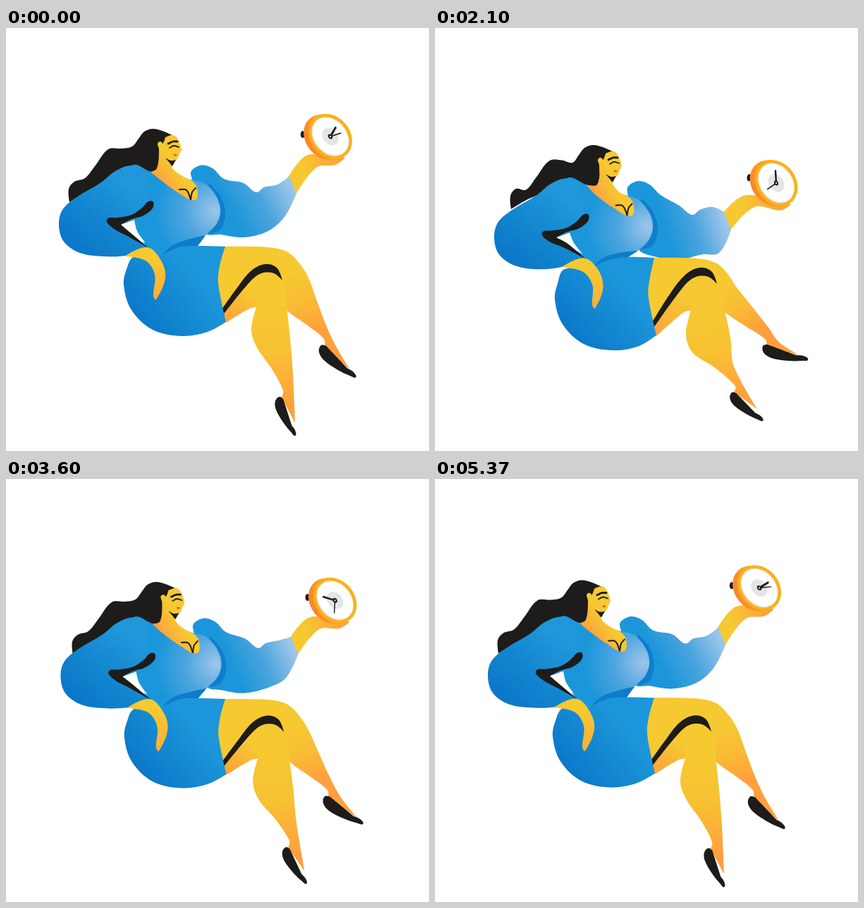
An HTML page with a canvas that plays this animation: 600x600 px, repeating every 5410 ms.

```html
<!DOCTYPE html>
<html lang="en">
<head>
<meta charset="utf-8">
<title>Tossing a watch</title>
<style>
html, body { margin: 0; width: 100%; height: 100%; overflow: hidden; background: #fff; }
canvas { display: block; width: 100vmin; height: 100vmin; }
</style>
</head>
<body>
<canvas id="stage" width="600" height="600"></canvas>
<script>
const ctx = document.getElementById('stage').getContext('2d');
const LOOP = 5410, TOSS = LOOP / 4, TURN = 2 * Math.PI, RAD = Math.PI / 180;
const BLACK = '#1d1c1a', YELLOW = '#f6c931', ORANGE = '#ff9f3e';
const BLUE = '#1c96da', DEEP = '#0a76c7', LIGHT = '#9cc6e9';

// Each toss eases from rest through three poses and back
const BEATS = [['rest', 0], ['crouch', 265], ['reach', 572], ['land', 747], ['rest', 977]];
const QUICK = 0.42, MEDIUM = 0.62, SLOW = 1;

// Offset [x, y, turn] of a joint in each pose; pace says how early it follows
const joint = (pace, crouch, reach, land, at = [0, 0]) =>
  ({ pace, at, rest: [0, 0, 0], crouch, reach, land });

const JOINTS = {
  h: joint(QUICK, [4, 20], [-1, -19], [3, 21]),                            // hip
  t: joint(MEDIUM, [4, 20], [-8, -39], [0, 16]),                           // lap
  j: joint(MEDIUM, [6, 18], [2, -37], [8, 5]),                             // front knee
  a: joint(SLOW, [-20, 28, 0], [14, -73, -16], [18, 1, -26], [447, 450]),  // back foot
  p: joint(MEDIUM, [-22, 22, -10], [-2, -36, 3], [33, -6, -26], [388, 523]), // front foot
  s: joint(QUICK, [14, 20], [-8, -17], [9, 19]),                           // shoulder
  b: joint(MEDIUM, [10, 22], [-7, -30], [5, 22]),                          // chest
  o: joint(MEDIUM, [20, 24], [-12, -27], [16, 23]),                        // head
  q: joint(SLOW, [46, -8], [-9, -16], [18, 10]),                           // hair tip
  l: joint(QUICK, [12, 12], [36, -55], [14, 13]),                          // resting hand
  c: joint(SLOW, [24, 44], [-11, -45], [8, 51]),                           // far cuff
  f: joint(SLOW, [52, 74, 24], [-25, -85, -60], [24, 66, 5], [481, 184]),  // tossing hand
  v: joint(SLOW, [26, 22], [-50, -38], [5, 7])                             // watch: tilt, spin
};

const ease = u => (1 - Math.cos(Math.PI * u)) / 2;

function offset(J, t, axis) {
  let i = BEATS.length - 1;
  while (BEATS[i][1] > t) i--;
  if (i === BEATS.length - 1) return 0;
  const [from, t0] = BEATS[i], [to, t1] = BEATS[i + 1];
  let power = axis === 1 ? J.pace : 1;
  if (to === 'crouch') power = 1.5;
  if (to === 'land') power = 1;
  const k = ease(((t - t0) / (t1 - t0)) ** power);
  const v0 = J[from][axis] || 0, v1 = J[to][axis] || 0;
  return v0 + (v1 - v0) * k;
}

const pose = {};

function setPose(t) {
  const breath = 1.8 * Math.max(0, Math.sin(Math.PI * (t - 900) / (TOSS - 900)));
  for (const name in JOINTS) {
    const J = JOINTS[name];
    pose[name] = {
      x: offset(J, t, 0), y: offset(J, t, 1) + (t > 900 ? breath : 0),
      r: offset(J, t, 2) * RAD, at: J.at
    };
  }
}

// A point bound to the mean of its joints; a capital letter ignores the turn
function place(names, x, y) {
  let px = 0, py = 0;
  for (const name of names) {
    const low = name.toLowerCase(), J = pose[low], r = low === name ? J.r : 0;
    const dx = x - J.at[0], dy = y - J.at[1], c = Math.cos(r), s = Math.sin(r);
    px += J.at[0] + J.x + dx * c - dy * s;
    py += J.at[1] + J.y + dx * s + dy * c;
  }
  return { x: px / names.length, y: py / names.length };
}

// "joints x,y x,y! joints ..." where ! marks a corner
function points(spec) {
  let names = '';
  const out = [];
  for (const word of spec.trim().split(/\s+/)) {
    if (/^[a-z]/i.test(word)) { names = word; continue; }
    const [x, y] = word.replace('!', '').split(',').map(Number);
    out.push({ ...place(names, x, y), corner: word.endsWith('!') });
  }
  return out;
}

function trace(ps, closed) {
  const n = ps.length;
  const at = i => closed ? ps[(i + n) % n] : ps[Math.max(0, Math.min(n - 1, i))];
  const dir = i => {
    if (at(i).corner) return [0, 0];
    const dx = at(i + 1).x - at(i - 1).x, dy = at(i + 1).y - at(i - 1).y;
    const d = Math.hypot(dx, dy) || 1;
    return [dx / d, dy / d];
  };
  ctx.beginPath();
  ctx.moveTo(ps[0].x, ps[0].y);
  for (let i = 0; i < (closed ? n : n - 1); i++) {
    const p = at(i), q = at(i + 1), d0 = dir(i), d1 = dir(i + 1);
    const h = Math.hypot(q.x - p.x, q.y - p.y) / 3;
    ctx.bezierCurveTo(p.x + d0[0] * h, p.y + d0[1] * h, q.x - d1[0] * h, q.y - d1[1] * h, q.x, q.y);
  }
}

function shape(spec, fill) {
  trace(points(spec), true);
  ctx.fillStyle = fill;
  ctx.fill();
}

function stroke(spec, width) {
  trace(points(spec), false);
  ctx.strokeStyle = BLACK;
  ctx.lineWidth = width;
  ctx.lineCap = 'round';
  ctx.stroke();
}

function stops(g, colors) {
  colors.forEach((c, i) => g.addColorStop(i / (colors.length - 1), c));
  return g;
}

function linear(spec, ...colors) {
  const [p, q] = points(spec);
  return stops(ctx.createLinearGradient(p.x, p.y, q.x, q.y), colors);
}

function radial(spec, radius, ...colors) {
  const [p] = points(spec);
  return stops(ctx.createRadialGradient(p.x, p.y, 0, p.x, p.y, radius), colors);
}

function oval(x, y, a, b, turn, fill) {
  ctx.beginPath();
  ctx.ellipse(x, y, a, b, turn, 0, TURN);
  ctx.fillStyle = fill;
  ctx.fill();
}

// Rests in the hand until the free flight lifts it off
function drawWatch(t, time) {
  const x = 460 + pose.f.x;
  const y = Math.min(154 + pose.f.y, 25 + 0.0049 * (t - 537) ** 2);
  const a = 30.5, b = 23.5, tilt = 50 * RAD + pose.v.x * RAD, spin = pose.v.y * RAD;
  const c = Math.cos(spin), s = Math.sin(spin);
  const off = (dx, dy) => [x + dx * c - dy * s, y + dx * s + dy * c];

  oval(...off(-39, -3), 3.2, 5, spin, BLACK);
  const rim = ctx.createLinearGradient(x - 34, y + 14, x + 24, y - 10);
  stops(rim, ['#f98232', '#fba41f', '#f9b51a']);
  for (let d = 7; d >= 0; d--) oval(...off(-d, d * 0.15), a + 4, b + 4.5, tilt, rim);
  oval(x, y, a + 4, b + 4.5, tilt, '#f9b218');
  oval(x, y, a, b, tilt, '#e9e6e2');
  oval(x + 0.4, y - 0.4, a - 1.5, b - 1.5, tilt, '#fff');

  ctx.save();
  ctx.translate(x, y);
  ctx.rotate(tilt);
  ctx.scale(1, b / a);
  ctx.rotate(spin - tilt);
  oval(0, 0, 13.5, 13.5, 0, '#e4e5e7');
  ctx.strokeStyle = BLACK;
  ctx.lineCap = 'round';
  const hand = (start, turns, length, width) => {
    const ang = start * RAD - turns * TURN * time / LOOP;
    ctx.beginPath();
    ctx.moveTo(0, 0);
    ctx.lineTo(Math.sin(ang) * length, -Math.cos(ang) * length);
    ctx.lineWidth = width;
    ctx.stroke();
  };
  hand(35, 8, 19, 2.9);
  hand(67, 4, 20, 1.6);
  oval(0, 0, 3.7, 3.7, 0, BLACK);
  oval(0, 0, 1.3, 1.3, 0, '#ddd');
  ctx.restore();
}

function drawFarArm() {
  shape('c 400,212! ccF 424,182 f 452,179 481,184! 467,194 ccF 440,198 c 411,236!',
    linear('ccF 420,205 f 474,188', YELLOW, ORANGE));
  shape(`bo 262,207 275,195 293,199 309,214 boc 337,220 355,233 366,226 385,222
    c 402,210! 412,235! 395,268 boc 370,289 335,297 305,293 b 282,290 282,250`,
    linear('boc 322,265 c 402,222', BLUE, '#4ba4de', LIGHT));
  shape('b 288,220! 304,238 311,263 304,286 288,292! 282,262', '#0d7fcd');
}

function drawTorso() {
  shape(`s 178,195 206,204 bo 262,215 b 284,222 300,242 304,262 298,279 285,292
    t 271,309! ht 222,325 s 190,298 180,268 165,230`,
    radial('b 296,260', 84, LIGHT, '#4ea5df', BLUE));
}

function drawHair() {
  shape(`o 208,143 222,146 240,154! 226,158 218,186 s 222,206! 180,206
    q 118,231 90,247! 89,228 97,218 oq 112,213 126,196 145,172 163,171
    o 179,168 188,157 196,147`, BLACK);
}

function drawFace() {
  shape(`o 226,155! 238,152 246,162 249,173! 246,179 243,186 236,192 237,200
    bo 252,211 264,217 271,227 268,244 245,234 217,214 s 205,204! o 214,199 217,172
    215,164 219,161 223,165!`, linear('o 236,192 s 211,211', YELLOW, ORANGE));
  shape('o 226,184! 234,188 241,187! 236,196!', BLACK);
  stroke('o 230,164 237,161 243,161', 2.8);
  stroke('o 232,170 238,167 245,169', 1.8);
  const mouth = place('o', 240, 180);
  oval(mouth.x, mouth.y, 2.6, 1.5, 0, '#e9602c');
  stroke('bo 246,229 256,230 262,243', 2);
  stroke('bo 262,243 264,233 269,227', 2);
}

// One shoe outline, heel at the joint, toe along the angle
function shoe(name, angle, size) {
  const [x, y] = JOINTS[name].at;
  const c = Math.cos(angle * RAD) * size, s = Math.sin(angle * RAD) * size;
  const outline = [[0, 0], [4, 9], [17, 13], [40, 10], [60, 4], [67, 0], [59, -3], [50, -1], [6, -4]];
  const ps = outline.map(([u, v]) => place(name, x + u * c - v * s, y + u * s + v * c));
  ps[7].corner = ps[8].corner = true;
  trace(ps, true);
  ctx.fillStyle = BLACK;
  ctx.fill();
}

function drawLegs() {
  // back leg
  shape(`t 305,310! 372,311 398,317 413,330 428,352 tA 441,387 A 455,424 a 470,455 489,486! 452,452!
    A 451,441 AAj 428,422 jA 398,400 j 365,360`,
    linear('t 412,345 AAj 438,430', YELLOW, '#f9bb35', ORANGE));
  shoe('a', 42.6, 1);
  // front leg
  shape(`t 305,312! 350,316 jt 383,338 j 396,365 jA 399,402 jjP 403,440 p 407,490 410,560! 391,524!
    P 393,514 jP 376,482 j 357,455 348,429 355,396! 345,398 hht 312,418! 296,365`,
    linear('j 380,385 p 390,535', YELLOW, '#f8c033', ORANGE));
  shape('j 355,396! 345,398 hht 312,418! 306,405 j 330,380 350,370',
    linear('j 345,372 hht 318,416', 'rgba(255,159,62,0)', 'rgba(255,159,62,.85)'));
  shoe('p', 68, 0.89);
  shape('hht 304,402! j 326,371 347,345 367,335 384,340 392,358! 380,348 362,348 346,360 hht 307,408!', BLACK);
}

function drawSkirt() {
  shape('ht 218,326! 235,309 bt 258,300 b 283,294! t 271,311! ht 245,318', '#0c7ccb');
  shape(`ht 182,324 218,324! 245,311 t 272,309 311,310! ht 303,338 301,362 hht 312,417! h 286,431
    250,437 208,428 178,400 167,365 h 171,342`, linear('h 180,415 ht 265,345', DEEP, BLUE));
}

function drawNearArm() {
  shape(`s 178,195 155,203 135,219 100,240 80,258 75,280 82,303 105,319 140,324 sl 175,322 202,311!
    s 180,294 164,278! 182,272 200,240 196,204`,
    linear('s 95,315 172,222', DEEP, '#1386d0', '#2097db'));
  shape('s 163,279! 182,272! ssl 186,288 sl 198,305! ssl 177,292', '#fff');
  shape(`s 143,272 158,269 178,265 192,256 202,246 209,247 207,257 193,267 178,271 163,279!
    sl 176,290 202,312! ssl 172,295 s 152,284`, BLACK);
  shape('sl 168,324! 200,311 sll 220,330 226,354 l 213,385 209,380 sll 211,350 sl 198,330',
    linear('sl 205,325 l 214,382', YELLOW, '#fbb038'));
}

function draw(time) {
  const t = time % TOSS;
  setPose(t);
  ctx.clearRect(0, 0, 600, 600);
  drawFarArm();
  drawWatch(t, time);
  drawHair();
  drawTorso();
  drawFace();
  drawLegs();
  drawSkirt();
  drawNearArm();
}

const start = performance.now();
function tick() {
  draw((performance.now() - start) % LOOP);
  requestAnimationFrame(tick);
}
tick();
</script>
</body>
</html>
```
